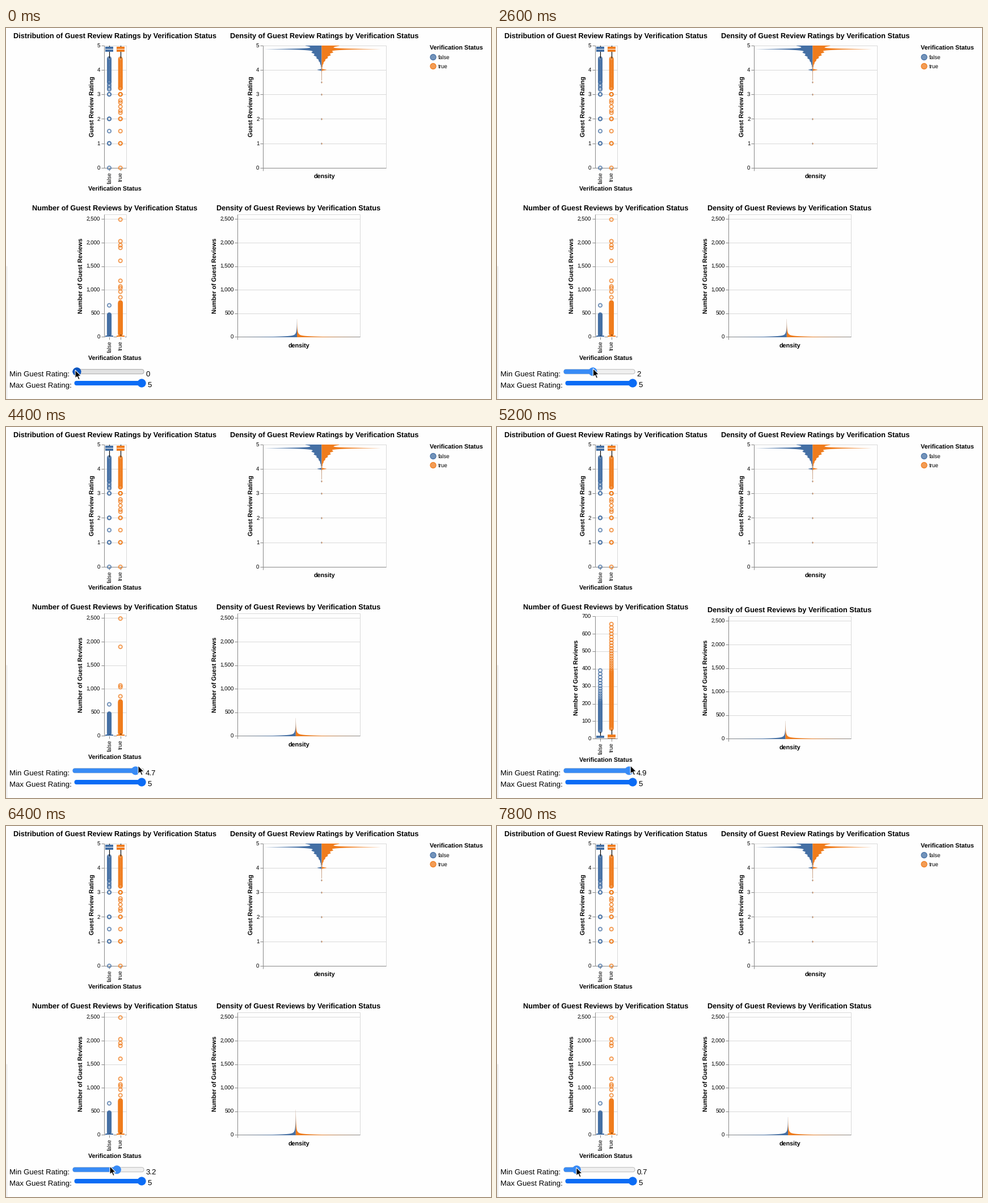
A matplotlib script for the animation above (8 s loop, 855x655 px).

```python
import matplotlib.pyplot as plt
import numpy as np
from matplotlib.animation import FuncAnimation
from matplotlib.patches import Circle, FancyBboxPatch, Polygon, Rectangle

W, H, DPI = 855, 655, 100
PT = 72 / DPI                      # points per pixel
BLUE, ORANGE = "#446fa4", "#f07c1c"
SIDES = ((182, "false", BLUE), (201.7, "true", ORANGE))
FRAMES, STEP = 40, 200

plt.rcParams.update({
    "font.family": "Liberation Sans",
    "text.hinting": "none",
    "text.kerning_factor": 0,
})

fig = plt.figure(figsize=(W / DPI, H / DPI), dpi=DPI, facecolor="#fefefe")


def reset(ax):
    ax.clear()
    ax.set_xlim(0, W)
    ax.set_ylim(H, 0)
    ax.axis("off")


def layer():
    ax = fig.add_axes([0, 0, 1, 1])
    reset(ax)
    return ax


def text(ax, x, y, s, size=9.8, ha="left", bold=False, turn=0):
    ax.text(x, y, s, fontsize=size * PT, ha=ha, va="baseline", rotation=turn,
            rotation_mode="anchor", weight="bold" if bold else "normal", color="black")


def line(ax, x0, y0, x1, y1, color="#888888", width=1.0, z=1):
    ax.plot([x0, x1], [y0, y1], color=color, lw=width * PT, zorder=z,
            solid_capstyle="butt")


def frame(ax, x0, x1, y0, y1, ticks, top, title_x, y_title):
    """Plot area with horizontal grid, y axis and rotated axis title."""
    for val in ticks:
        y = y1 - val / top * (y1 - y0)
        line(ax, x0, y, x1, y, "#d9d9d9")
        line(ax, x0 - 5, y, x0, y)
        text(ax, x0 - 6.5, y + 3.5, f"{val:,}", ha="right")
    line(ax, x0, y0, x1, y0, "#d9d9d9")
    line(ax, x1, y0, x1, y1, "#d9d9d9")
    line(ax, x0, y0, x0, y1, z=1.2)
    line(ax, x0, y1, x1, y1, z=1.2)
    text(ax, title_x, (y0 + y1) / 2, y_title, 10.78, "center", True, 90)


def title(ax, x, y, s):
    text(ax, x, y, s, 12.74, "center", True)


def status_axis(ax, y):
    for x, name, _ in SIDES:
        line(ax, x, y, x, y + 5)
        text(ax, x + 3.5, y + 7, name, ha="right", turn=90)
    text(ax, 192.2, y + 41, "Verification Status", 10.78, "center", True)


def density_axis(ax, x0, x1, y):
    line(ax, x0, y, x0, y + 5)
    text(ax, (x0 + x1) / 2, y + 19, "density", 10.78, "center", True)


def rings(ax, x, ys, color):
    ax.scatter(np.full(len(ys), x), ys, s=(6.2 * PT) ** 2, facecolors="none",
               edgecolors=color, linewidths=1.9 * PT, alpha=0.75, zorder=3)


def box(ax, x, top, bottom, mid, color, low, high):
    line(ax, x, low, x, high, "black", 1.2, 4)
    ax.add_patch(Rectangle((x - 7, top), 14, bottom - top, fc=color, ec="none", zorder=5))
    line(ax, x - 7, mid, x + 7, mid, "white", 1, 6)


def violin(ax, cx, ys, left, right):
    for edge, color in ((cx - left, BLUE), (cx + right, ORANGE)):
        ax.fill_betweenx(ys, cx, edge, color=color, lw=0, zorder=3)


def bar(ax, x0, x1, y, fill, edge="none", z=2):
    ax.add_patch(FancyBboxPatch((x0, y - 4), x1 - x0, 8, fc=fill, ec=edge, lw=PT, zorder=z,
                                boxstyle="round,pad=0,rounding_size=3.9"))


def knob(ax, x, y, color):
    ax.add_patch(Circle((x, y), 7.5, fc=color, ec="none", zorder=4))


# ---- fixed part: upper row, legend, lower slider ----

def averages(low, high, reviews):
    """Ratings that a mean of up to so many whole scores can take."""
    vals = {n / d for d in range(1, reviews + 1) for n in range(5 * d)}
    return sorted(v for v in vals if low <= v <= high)


def bump(y, at, size, spread):
    return size * np.exp(-((y - at) / spread) ** 2)


def rating_density(y, grow, phase):
    ripple = 1 + 0.12 * np.cos((y - 43) * 1.25 + phase)
    w = grow * bump(y, 38, 17, 17) * ripple + bump(y, 30.5, 16, 1.7)
    w += 86 * np.exp(-np.abs(y - 36.8) / 0.85) + bump(y, 73.4, 7 * grow, 1)
    for rating in (3.5, 3, 2, 1):
        w += bump(y, 247 - 43.3 * rating, 1.2, 1.3)
    return w + np.where(y < 92, 0.4, 0)


def draw_base(ax):
    line(ax, 854.5, 0, 854.5, H, "#b9b9b9")
    line(ax, 0, 654.5, W, 654.5, "#b0b0b0")
    line(ax, 0.5, 420, 0.5, H, "#dcdcdc")

    title(ax, 192, 18.5, "Distribution of Guest Review Ratings by Verification Status")
    title(ax, 561, 18.5, "Density of Guest Review Ratings by Verification Status")

    y0, y1 = 30.5, 247
    frame(ax, 172.5, 211.5, y0, y1, range(6), 5, 155.5, "Guest Review Rating")
    status_axis(ax, y1)
    for (x, _, color), low, reviews, dense in zip(SIDES, (3.2, 2.25), (5, 4), (3.5, 3.25)):
        vals = np.concatenate([[0, 1.5], [1, 2, 3] * 2, averages(low, dense, reviews),
                               np.arange(dense, 4.47, 0.04)])
        rings(ax, x, y1 - vals / 5 * (y1 - y0), color)
        box(ax, x, 32.5, 41.5, 37.2, color, 30.5, 53)

    frame(ax, 453, 669.5, y0, y1, range(6), 5, 436, "Guest Review Rating")
    density_axis(ax, 453, 669.5, y1)
    ys = np.linspace(y0, 206, 1400)
    violin(ax, 556, ys, rating_density(ys, 1, 0), rating_density(ys, 1.12, 0.6))

    text(ax, 747, 39, "Verification Status", 10.78, bold=True)
    for y, (_, name, color) in zip((51.5, 67.5), SIDES):
        ax.add_patch(Circle((753, y), 5, fc=color, ec="none", alpha=0.75))
        ax.add_patch(Circle((753, y), 5, fc="none", ec=color, lw=1.2 * PT))
        text(ax, 762, y + 3.5, name)

    text(ax, 6, 614.8, "Min Guest Rating:", 13.25)
    text(ax, 6, 635, "Max Guest Rating:", 13.25)
    text(ax, 249, 635, "5", 13.25)
    bar(ax, 120.5, 239.5, 627, "#0b6cf5")
    knob(ax, 239.2, 627, "#0b6cf5")


# ---- moving part: lower row, upper slider, pointer ----
TOP_RATED = [2490, 1890, 1070, 1035, 840]
LOWER_RATED = [2030, 1945, 1615, 1190, 960]


def counts(v, tight):
    """Outlying review counts for both groups."""
    if tight:
        few = [np.arange(45, 216, 5), np.geomspace(222, 390, 12)]
        many = [np.arange(58, 390, 5), np.geomspace(395, 655, 18)]
    else:
        few = [np.arange(46, 476, 6), [670]]
        many = [np.arange(60, 735, 6), TOP_RATED, LOWER_RATED if v < 4.5 else []]
    return np.concatenate(few), np.concatenate(many)


def draw_reviews(ax, v):
    tight = v > 4.85
    top, dy = (700, 5) if tight else (2600, 0)
    y0, y1 = 329 + dy, 545.4 + dy
    scale = (y1 - y0) / top

    title(ax, 191.8, 322, "Number of Guest Reviews by Verification Status")
    title(ax, 515.7, 322 + dy, "Density of Guest Reviews by Verification Status")

    frame(ax, 172.5, 211.5, y0, y1, range(0, top + 1, 100 if tight else 500), top,
          144 if tight else 135.8, "Number of Guest Reviews")
    status_axis(ax, y1)
    for (x, _, color), vals, upper, reach in zip(SIDES, counts(v, tight), (17, 23), (40, 53)):
        rings(ax, x, y1 - vals * scale, color)
        height = max(upper * scale, 2)
        box(ax, x, y1 - height, y1, y1 - 0.35 * height, color, y1 - reach * scale, y1)

    frame(ax, 408, 624, y0, y1, range(0, 2501, 500), 2600, 371.8,
          "Number of Guest Reviews")
    density_axis(ax, 408, 624, y1)
    cx = 512.5 if v < 1 else 508 if tight else 510.3
    peak = 45 if 3 <= v < 4 else 32
    h = np.linspace(0, peak, 500)
    w = 0.87 * np.exp(-h / 0.85) + 0.1 * np.exp(-h / 2.8) + 0.03 * np.exp(-h * 3.6 / peak)
    violin(ax, cx, y1 - h, w * (cx - 408), w * (624 - cx))


# the hand drags up, rests near the end, then drags back; the knob trails it
DRAG_T = [1400, 2400, 2700, 4200, 4600, 5200, 6200, 6400, 7600]
DRAG_V = [0, 2, 2, 4.7, 4.9, 4.9, 3.2, 2.6, 0.7]
LAG, PRESS = 200, 600
ARROW = np.array([(0, 0), (0, 14.6), (3.4, 11.5), (5.8, 17), (8.2, 16),
                  (5.8, 10.6), (10.4, 10.6)])


def drag(t):
    return float(np.interp(t, DRAG_T, DRAG_V))


def draw_slider(ax, v, t):
    if t < PRESS:
        fill, track, edge = "#0a55c0", "#e2e2e2", "#a8a8a8"
    else:
        fill, track, edge = "#388bf6", "#f0f0f0", "#bcbcbc"
    x = 125 + 22 * v
    bar(ax, 118, 243, 606.7, track, edge)
    bar(ax, 117.5, x + 1, 606.7, fill, z=3)
    knob(ax, x, 606.8, fill)
    text(ax, 246, 614.8, f"{v:g}", 13.25)

    hand = drag(t)
    tip = (122 + 2 * min(t / 1200, 1) + 22.7 * hand, 603.8 - 1.25 * hand)
    ax.add_patch(Polygon(ARROW + tip, fc="black", ec="white", lw=1.1 * PT, zorder=9))


base, live = layer(), layer()
draw_base(base)


def update(i):
    t = i * STEP
    v = round(drag(t - LAG), 1)
    reset(live)
    draw_reviews(live, v)
    draw_slider(live, v, t)
    return []


anim = FuncAnimation(fig, update, frames=FRAMES, interval=STEP, repeat=True,
                     repeat_delay=0, blit=False)
plt.show()
```
